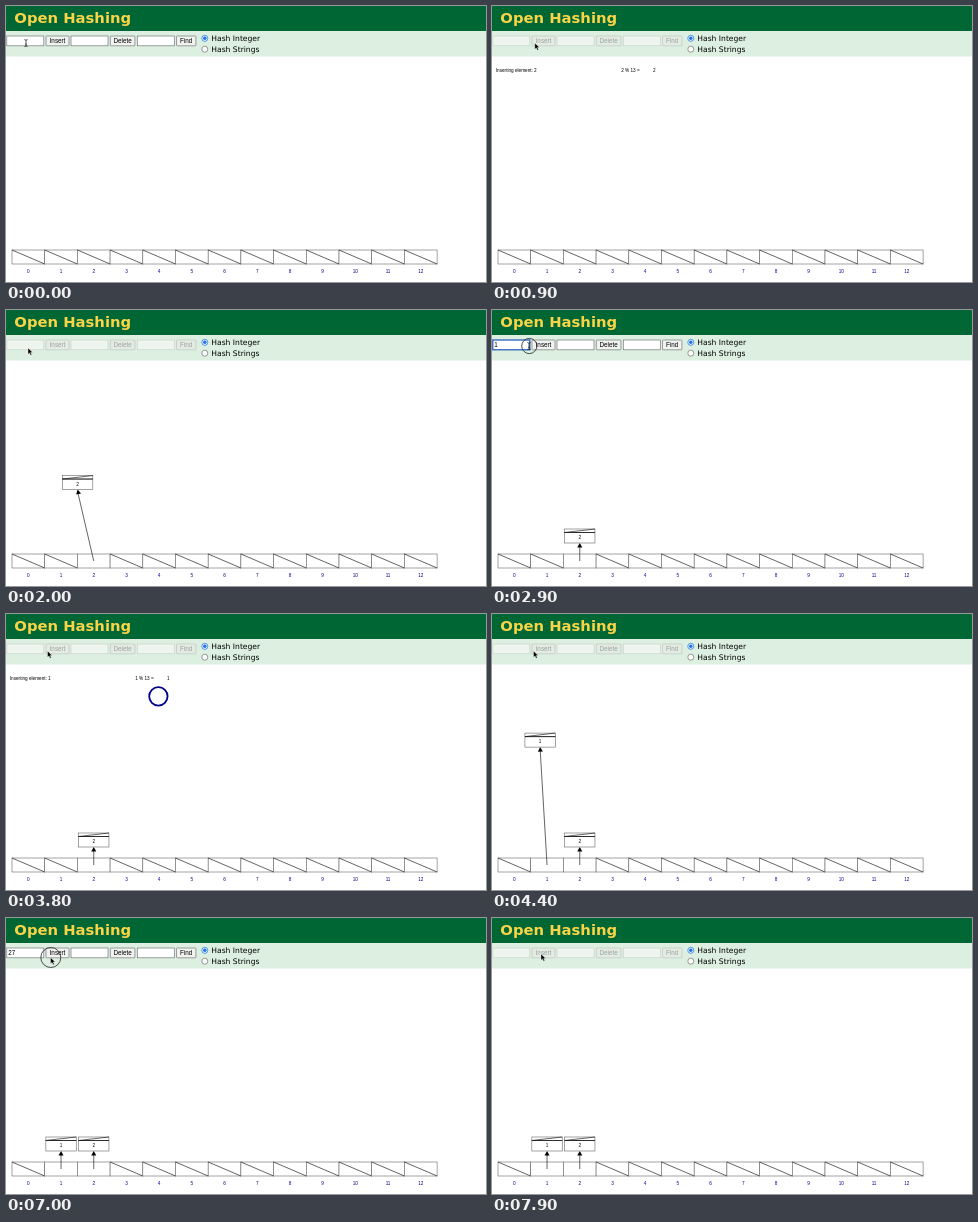
An HTML page that plays this animation: 480x276 px, repeating every 8000 ms.

```html
<!DOCTYPE html>
<html>
<head>
<meta charset="utf-8">
<title>Open Hashing</title>
<style>
html, body { margin: 0; width: 100%; height: 100%; overflow: hidden; background: #fff; }
svg { display: block; width: 480px; height: 276px; }
text { font-family: Arial, "Liberation Sans", sans-serif; font-size: 4.67px; }
.ui { font-size: 6.3px; }
.wide { font-family: Verdana, "DejaVu Sans", sans-serif; font-size: 7.6px; }
.title { font-family: Verdana, "DejaVu Sans", sans-serif; font-size: 14.8px; font-weight: bold; }
.mid { text-anchor: middle; }
.box { fill: #fff; stroke: #666; stroke-width: .6; }
.thin { fill: none; stroke: #111; stroke-width: .65; }
</style>
</head>
<body>
<svg id="stage" viewBox="0 0 480 276"></svg>
<script>
const LOOP = 8000, STEP = 100, BLOCK = 500;
const PITCH = 32.7, LEFT = 6, TOP = 244, CELL_H = 14;
const NODE_W = 30.4, NODE_H = 14;
const cellX = i => LEFT + PITCH * (i + .5);
const lerp = (a, b, k) => a + (b - a) * k;
const stage = document.getElementById("stage");

function add(tag, attrs, parent = stage, content) {
  const el = document.createElementNS("http://www.w3.org/2000/svg", tag);
  set(el, attrs);
  if (content !== undefined) el.textContent = content;
  parent.appendChild(el);
  return el;
}
function set(el, attrs) {
  for (const k in attrs) el.setAttribute(k, attrs[k]);
}
function show(el, on) {
  el.setAttribute("visibility", on ? "visible" : "hidden");
}
const move = (el, x, y) => set(el, { transform: `translate(${x} ${y})` });

// lock: controls disabled; start: circle begins to move; then the node drops
const inserts = [
  { value: 2, slot: 2, lock: 690, start: 1190 },
  { value: 1, slot: 1, lock: 3290, start: 3755 },
  { value: 27, slot: 1, lock: 7850, start: 8350 }
];
const typed = [[0, ""], [300, "2"], [690, ""], [2700, "1"], [3290, ""], [5900, "2"], [6100, "27"], [7850, ""]];
const focus = [[200, 600], [2400, 3050], [5300, 6850]];
const clicks = [150, 550, 2800, 3100, 5300, 6800, 7550];
const hidden = [[5900, 6100]];
const path = [
  [0, 20, 37], [400, 20, 37], [600, 44, 37], [800, 44, 37], [1500, 22, 38],
  [2300, 22, 38], [2450, 22, 36], [2700, 24, 36], [2850, 37, 36], [2950, 37, 36],
  [3100, 43, 37], [3500, 43, 37], [3600, 41.5, 37], [4800, 41.5, 37],
  [5250, 28, 36], [6100, 28, 36], [6600, 44.5, 39.5], [7500, 44.5, 39.5],
  [7700, 49, 36], [8000, 49, 36]
];
const within = (spans, t) => spans.some(([a, b]) => t >= a && t < b);

// Page header and controls
add("rect", { width: 480, height: 25, fill: "#006633" });
add("text", { x: 8.3, y: 17.3, class: "title", fill: "#f8d548" }, stage, "Open Hashing");
add("rect", { y: 25, width: 480, height: 25.5, fill: "#dcefe0" });

const fields = [.8, 65, 131.3].map(x =>
  add("rect", { x, y: 30, width: 37, height: 9.8, "stroke-width": .7 }));
const buttons = [[40, 23, "Insert"], [104.3, 24.6, "Delete"], [170.5, 19.4, "Find"]].map(([x, w, label]) => ({
  box: add("rect", { x, y: 30, width: w, height: 9.8, rx: .6, "stroke-width": .7 }),
  label: add("text", { x: x + w / 2, y: 37.1, class: "ui mid" }, stage, label)
}));
const entry = add("text", { x: 2.2, y: 37.1, class: "ui", fill: "#000" });

[["Hash Integer", 32.3, true], ["Hash Strings", 43.2, false]].forEach(([label, y, on]) => {
  add("circle", { cx: 198.8, cy: y, r: 3, fill: on ? "#fff" : "#fcfefc", stroke: on ? "#1670e8" : "#777", "stroke-width": .75 });
  if (on) add("circle", { cx: 198.8, cy: y, r: 1.7, fill: "#1670e8" });
  add("text", { x: 205.3, y: y + 2.8, class: "wide" }, stage, label);
});

// Hash table
const slashes = [];
for (let i = 0; i < 13; i++) {
  const x = LEFT + PITCH * i;
  add("rect", { x, y: TOP, width: PITCH, height: CELL_H, class: "box" });
  slashes.push(add("path", { d: `M${x} ${TOP}l${PITCH} ${CELL_H}`, class: "thin" }));
  add("text", { x: cellX(i), y: 266.5, class: "mid", fill: "#00008c" }, stage, i);
}

// Linked nodes
const nodes = inserts.slice(0, 2).map(({ value, slot }) => {
  const g = add("g", {});
  const line = add("path", { class: "thin" }, g);
  const head = add("path", { d: "M0 0l-2.5 4.6h5z" }, g);
  const body = add("g", {}, g);
  const x = -NODE_W / 2, y = -NODE_H / 2;
  add("rect", { x, y, width: NODE_W, height: NODE_H, class: "box" }, body);
  add("path", { d: `M${x} ${y + 3.5}h${NODE_W}l${-NODE_W} 0l${NODE_W} -3.5`, class: "thin" }, body);
  add("text", { x: 0, y: 3.2, class: "mid" }, body, value);
  return { g, line, head, body, slot };
});

const note = add("text", { x: 3.8, y: 65.9 });
const formula = add("text", { x: 129.2, y: 65.9 });
const result = add("text", { x: 162.4, y: 65.9, class: "mid" });
const halo = add("circle", { r: 9.2, fill: "none", stroke: "#00008c", "stroke-width": 1.8 });

// Pointer
const ring = add("circle", { fill: "none", stroke: "#222", "stroke-width": .8 });
const beam = add("path", { d: "M-1.6 -3.4q1.6 0 1.6 1v5q0 1 -1.6 1M1.6 -3.4q-1.6 0 -1.6 1M1.6 3.6q-1.6 0 -1.6 -1M-.8 1.2h1.6", fill: "none", stroke: "#111", "stroke-width": .7 });
const arrow = add("path", { d: "M0 0v6.3l1.5 -1.4 1.1 2.4 1.2 -.5 -1.1 -2.4h2z", fill: "#000", stroke: "#fff", "stroke-width": .4 });

function pointerAt(t) {
  const i = path.findIndex(p => p[0] > t);
  const [t0, x0, y0] = path[i - 1], [t1, x1, y1] = path[i];
  const k = (t - t0) / (t1 - t0), e = k * k * (3 - 2 * k);
  return [lerp(x0, x1, e), lerp(y0, y1, e)];
}

function drawControls(t, locked) {
  const focused = within(focus, t);
  fields.forEach((f, i) => {
    const active = i === 0 && focused;
    set(f, {
      fill: locked ? "#eef4ee" : "#fff",
      stroke: locked ? "#cbd5cc" : active ? "#1c56b8" : "#777",
      "stroke-width": active ? 1.2 : .7
    });
  });
  buttons.forEach(b => {
    set(b.box, { fill: locked ? "#e4ebe4" : "#f1f3f1", stroke: locked ? "#bdc7be" : "#777" });
    set(b.label, { fill: locked ? "#9aa39b" : "#000" });
  });
  entry.textContent = typed.filter(([at]) => at <= t).pop()[1];
}

function drawInsert(t) {
  const job = inserts.find(j => t >= j.lock + 60 && t < j.start + BLOCK);
  const moving = job && t >= job.start;
  [note, formula, result].forEach(el => show(el, job && t < job.start + BLOCK));
  show(halo, moving);
  if (job) {
    note.textContent = "Inserting element: " + job.value;
    formula.textContent = job.value + " % 13 =";
    result.textContent = job.slot;
  }
  if (moving) {
    const k = (t - job.start) / BLOCK;
    set(halo, { cx: lerp(162, cellX(job.slot), k), cy: lerp(64.3, 265, k) });
  }
}

function drawNodes(t) {
  nodes.forEach((n, i) => {
    const born = inserts[i].start + BLOCK, on = t >= born;
    show(n.g, on);
    show(slashes[n.slot], !on);
    if (!on) return;
    const k = Math.min(1, (t - born) / BLOCK);
    const cx = cellX(n.slot), x = lerp(45.3, cx, k), y = lerp(85.3, 226, k);
    const tip = y + NODE_H / 2;
    const turn = Math.atan2(x - cx, 251 - tip) * 180 / Math.PI;
    move(n.body, x, y);
    set(n.line, { d: `M${cx} 251L${x} ${tip + 2}` });
    set(n.head, { transform: `translate(${x} ${tip}) rotate(${turn})` });
  });
}

function drawPointer(t, locked) {
  const [x, y] = pointerAt(t), visible = !within(hidden, t);
  const text = x < 38.5 && !locked;
  show(beam, visible && text);
  show(arrow, visible && !text);
  move(beam, x, y);
  move(arrow, x, y);
  const click = clicks.find(c => t >= c && t < c + 300);
  show(ring, click !== undefined);
  if (click !== undefined) set(ring, { cx: x + .3, cy: y, r: 5.2 + (t - click) * .024 });
}

function draw(time) {
  const t = Math.floor(time % LOOP / STEP) * STEP;
  const locked = inserts.some(j => t >= j.lock && t < j.start + 2 * BLOCK);
  drawControls(t, locked);
  drawInsert(t);
  drawNodes(t);
  drawPointer(t, locked);
}

let origin;
function tick(now) {
  if (origin === undefined) origin = now;
  draw(Math.max(0, now - origin));
  requestAnimationFrame(tick);
}
draw(0);
requestAnimationFrame(tick);
</script>
</body>
</html>
```
